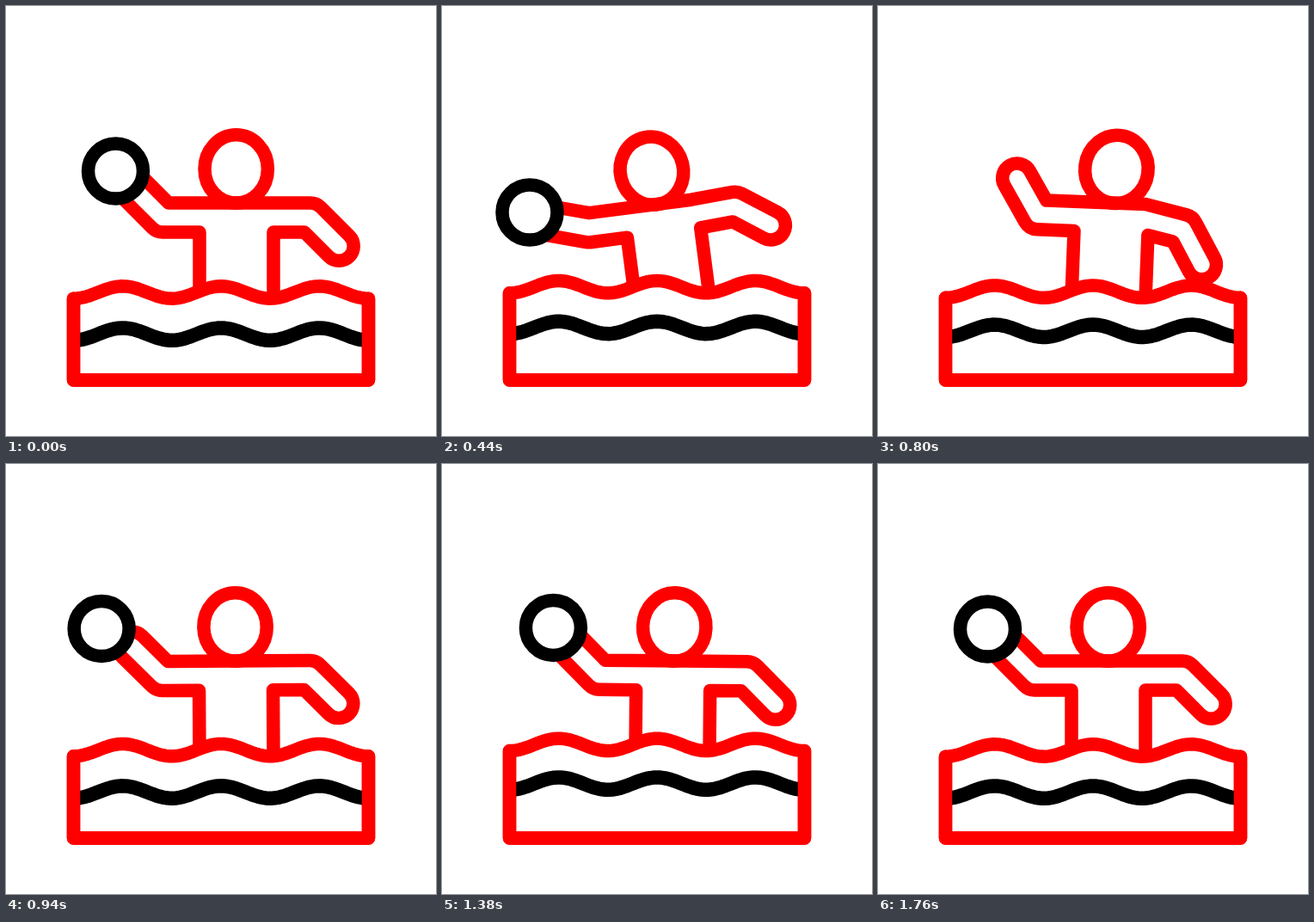
An HTML page for the animation above (2 s loop, 500 by 500 pixels).

```html
<!DOCTYPE html>
<html lang="en">
<head>
<meta charset="utf-8">
<title>Water polo</title>
<style>
  html, body { margin: 0; width: 100%; height: 100%; overflow: hidden; background: #fff; }
  svg { display: block; width: 100%; height: 100%; }
  path, ellipse, circle { fill: none; stroke: #f00; stroke-width: 15.5; stroke-linejoin: round; stroke-linecap: round; }
  #water, #ball { fill: #fff; }
  #ripple, #ball { stroke: #000; }
  #ripple { stroke-width: 16.5; stroke-linecap: butt; }
</style>
</head>
<body>
<svg viewBox="0 0 500 500">
  <g id="body">
    <path id="torso"/>
    <ellipse id="head" cx="267.7" cy="189.5" rx="36.7" ry="39.7"/>
  </g>
  <path id="water"/>
  <path id="ripple"/>
  <path id="frame"/>
  <circle id="ball" r="32"/>
</svg>
<script>
const LOOP = 2000, STEP = 20;
const BEGIN = 140, WOUND = 440, RELEASE = 560, THROWN = 640, SETTLED = 930, END = 1740;
const HALF = 17;   // half the limb width

const { sin, cos, tan, PI } = Math;
const set = (id, name, value) => document.getElementById(id).setAttribute(name, value);
const rad = deg => deg * PI / 180;
const progress = (t, from, to) => Math.min(1, Math.max(0, (t - from) / (to - from)));
const ease = (t, from, to) => {
  const u = progress(t, from, to);
  return u * u * (3 - 2 * u);
};
const pulse = (t, from, peak, to) => ease(t, from, peak) - ease(t, peak, to);

// A small swing that follows the throw.
const sway = t => -sin(2 * PI * progress(t, 900, END) ** 0.8);

function pose(t) {
  const wind = pulse(t, BEGIN, WOUND, THROWN);
  const fling = pulse(t, WOUND, THROWN, SETTLED);
  return {
    lean: -7.4 * wind + 9.6 * fling ** 1.7 + 0.65 * sway(t),
    nod: -6.5 * wind + 6.5 * pulse(t, WOUND, 740, 1000) + 2.4 * sway(t),
    throwArm: rad(45 - 27.5 * wind + 31.7 * fling),
    upperArm: rad(-3 * wind + 29 * fling),
    foreArm: rad(45 - 10 * wind + 35 * fling),
    reach: 49 - 4 * fling
  };
}

const along = ([x, y], angle, d) => [x + d * cos(angle), y + d * sin(angle)];
const line = points => points.map(p => 'L' + p).join('');
const arc = point => `A${HALF} ${HALF} 0 0 1 ${point}`;

// Outline of the trunk with both arms, drawn around shoulder, elbows and hands.
function torso({ throwArm: b, upperArm: g, foreArm: f, reach }) {
  const up = angle => angle - PI / 2, down = angle => angle + PI / 2;
  const elbowL = [182, 246], handL = along(elbowL, b + PI, 49);
  const shoulder = [305, 246];
  const elbowR = along(shoulder, g, reach), handR = along(elbowR, f, 47);
  const inner = along(elbowR, down((g + f) / 2), HALF / cos((f - g) / 2));
  const armpit = [311, inner[1] - (inner[0] - 311) * tan(g)];

  return 'M225 400' +
    line([[225, 263], [182, 263]]) + arc(along(elbowL, down(b), HALF)) +
    line([along(handL, down(b), HALF)]) + arc(along(handL, up(b), HALF)) +
    line([
      [182 + HALF * tan(b / 2), 229],
      [305 + HALF * tan(g / 2), 229],
      along(elbowR, up(g), HALF)
    ]) + arc(along(elbowR, up(f), HALF)) +
    line([along(handR, up(f), HALF)]) + arc(along(handR, down(f), HALF)) +
    line([inner, armpit, [311, 400]]);
}

function ball(t) {
  const size = 1 - ease(t, 722, 780) + ease(t, 820, 880);
  if (t > RELEASE && t < 800) {
    const left = 1 - progress(t, RELEASE, 722);
    return { x: 438 - 310.5 * left ** 2, y: 147 + 45 * left ** 5, size };
  }
  const wind = pulse(t, BEGIN, WOUND, RELEASE);
  const away = t > RELEASE ? 1 - ease(t, 820, 1000) : 0;
  return {
    x: 127.5 - 25.5 * wind - 58 * away + 2.5 * sway(t),
    y: 192 + 48 * wind - 6 * away - 2 * sway(t),
    size
  };
}

// Two swells per loop, meeting at time mid.
const swell = (t, peak1, mid, peak2) =>
  pulse(t, BEGIN, peak1, mid) + pulse(t, mid, peak2, 1760);

function wave(y) {
  let d = '';
  for (let i = 0; i <= 86; i++) {
    d += `${i ? 'L' : 'M'}${78.5 + i * 343 / 86} ${y + 7.2 * cos(i / 86 * 6 * PI)}`;
  }
  return d;
}

function draw(t) {
  const p = pose(t);
  set('body', 'transform', `rotate(${p.lean} 268 340)`);
  set('head', 'transform', `rotate(${p.nod} 268 229)`);
  set('torso', 'd', torso(p));

  const level = 333 - 7 * swell(t, 510, 880, 1320);
  const edge = level + 7.2;
  set('water', 'd', wave(level) + 'V435H78.5Z');
  set('ripple', 'd', wave(381.6 - 10 * swell(t, 580, 960, 1380)));
  set('frame', 'd', `M78.5 ${edge}V435H421.5V${edge}`);

  const { x, y, size } = ball(t);
  set('ball', 'transform', `translate(${x} ${y}) scale(${size})`);
  set('ball', 'visibility', size > 0.01 ? 'visible' : 'hidden');
}

const start = performance.now();
function tick() {
  const t = (performance.now() - start) % LOOP;
  draw(Math.floor(t / STEP) * STEP);
  requestAnimationFrame(tick);
}
tick();
</script>
</body>
</html>
```
